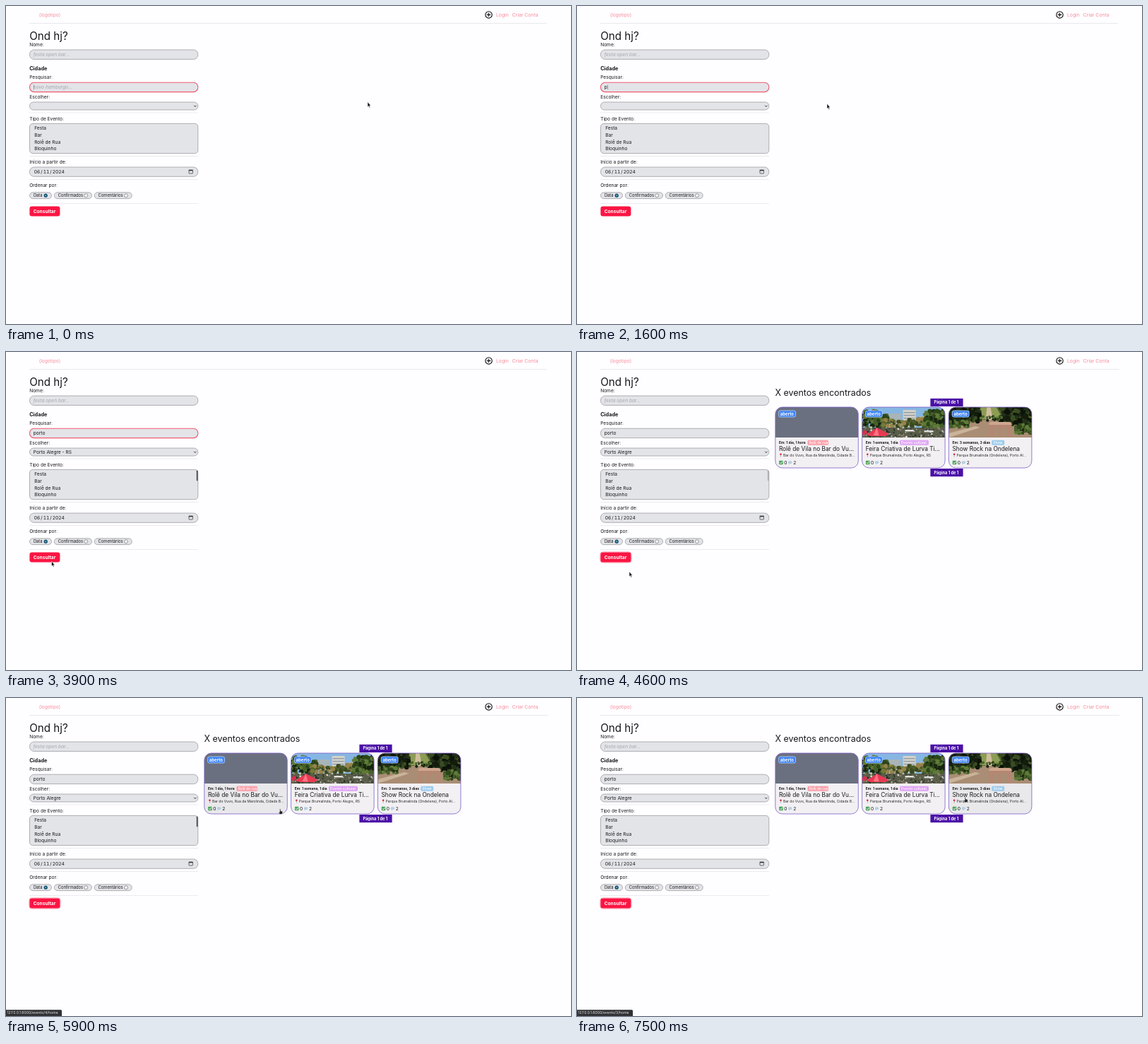
These frames come from a looping animation (800 px wide and 450 px high, 8000 ms). An HTML page:

```html
<!DOCTYPE html>
<html lang="pt-BR">
<head>
<meta charset="utf-8">
<title>Busca de eventos</title>
<style>
html, body { margin: 0; width: 100%; height: 100%; overflow: hidden; background: #fefdff; }
svg { display: block; width: 100vw; height: 100vh; font-family: Inter, sans-serif; }
text { white-space: pre; }
.date { font-variant-numeric: tabular-nums; }
</style>
</head>
<body>
<svg id="stage" viewBox="0 0 800 450"></svg>
<script>
const INK = '#18181b', FIELD = '#e3e4e8', EDGE = '#9c9ca3', PINK = '#f78d9b';

// Text placed by its left edge and the middle of its capitals.
const text = (x, cy, str, size = 6.6, fill = INK, attrs = '') =>
  `<text x="${x}" y="${cy + size * 0.364}" font-size="${size}" fill="${fill}" ${attrs}>${str}</text>`;
const bold = (x, cy, str, size, fill = INK) => text(x, cy, str, size, fill, 'font-weight="700"');
const rect = (x, y, w, h, fill, r = 0, attrs = '') =>
  `<rect x="${x}" y="${y}" width="${w}" height="${h}" rx="${r}" fill="${fill}" ${attrs}/>`;
const circle = (x, y, r, fill, attrs = '') =>
  `<circle cx="${x}" cy="${y}" r="${r}" fill="${fill}" ${attrs}/>`;
const path = (d, fill, attrs = '') => `<path d="${d}" fill="${fill}" ${attrs}/>`;
const field = (y, h, r = 6.3, id = '') =>
  rect(33.5, y, 238.3, h, FIELD, r, `stroke="${EDGE}" stroke-width=".8" ${id && `id="${id}"`}`);
const rule = y => rect(33, y, 239, 0.7, '#e4e4e8');

let seed = 7;
const random = () => (seed = (seed * 16807) % 2147483647) / 2147483647;
const blobs = (count, x, y, w, h, size, colors) => Array.from({ length: count }, () =>
  circle(x + random() * w, y + random() * h, size * (0.5 + random()),
    colors[Math.floor(random() * colors.length)])).join('');

function header() {
  return rect(33, 24, 733, 0.8, '#e4e4e8', 0, 'id="headerLine"') +
    text(46.7, 12.4, '(logotipo)', 6.7, PINK) +
    circle(683.5, 12.4, 4.7, 'none', 'stroke="#111" stroke-width="1.1"') +
    path('M680.8 12.4h5.4M683.5 9.7v5.4', 'none', 'stroke="#111" stroke-width="1.1"') +
    text(694, 12.4, 'Login', 6.8, PINK) + text(716.8, 12.4, 'Criar Conta', 6.8, PINK);
}

function radioPill(x, w, label, checked) {
  const cx = x + w - 8.3;
  return rect(x, 263.8, w, 8.8, FIELD, 4.4, `stroke="${EDGE}" stroke-width=".8"`) +
    text(x + 5.4, 268.2, label, 5.8) +
    (checked
      ? circle(cx, 268.2, 2.6, '#12506e') + circle(cx, 268.2, 1, '#7cc4ea')
      : circle(cx, 268.2, 2.5, '#f4f4f6', 'stroke="#666" stroke-width=".6"'));
}

function form() {
  const hint = (cy, str, id = '') => text(38.8, cy, str, 6.6, '#a3a6ae', `font-style="italic" id="${id}"`);
  const dateParts = ['06', '/', '11', '/', '2024'].map(s => `<tspan dx="1">${s}</tspan>`).join('');
  return text(33.2, 42, 'Ond hj?', 15.2) +
    text(33.2, 54.7, 'Nome:') + field(62, 13.4) + hint(68.7, 'festa open bar...', 'nameHint') +
    bold(33.2, 88.6, 'Cidade', 7.3) +
    text(33.2, 100.8, 'Pesquisar:') + field(108.2, 13.4, 6.3, 'search') +
    hint(114.8, 'novo hamburgo...', 'searchHint') + text(38.8, 114.8, '', 6.6, INK, 'id="typed"') +
    rect(39, 111.3, 0.5, 7, '#555', 0, 'id="caret"') +
    text(33.2, 128.3, 'Escolher:') + field(136, 11, 5.3) + text(38.8, 141.4, '', 6.6, INK, 'id="city"') +
    path('M266.2 140.8l1.6 1.7 1.6-1.7', 'none', 'stroke="#222" stroke-width=".9"') +
    rule(150.6) + text(33.2, 159.3, 'Tipo de Evento:') + field(166.4, 42.2, 4.5) +
    ['Festa', 'Bar', 'Rolê de Rua', 'Bloquinho'].map((s, i) => text(40.2, 173 + i * 9.6, s)).join('') +
    rect(269.8, 167.4, 1.7, 15, '#444', 0.8, 'id="scrollbar"') +
    rule(212) + text(33.2, 220.4, 'Início a partir de:') + field(228, 13.3) +
    text(38.8, 234.6, dateParts, 6.6, INK, 'class="date"') +
    rect(259, 232.2, 5.4, 4.8, 'none', 0.5, 'stroke="#333" stroke-width=".7"') +
    rect(258.8, 231.8, 5.8, 1.5, '#333') +
    rule(245.2) + text(33.2, 253.6, 'Ordenar por:') +
    radioPill(33.5, 31, 'Data', true) + radioPill(68.3, 53.2, 'Confirmados') +
    radioPill(125.2, 53, 'Comentários') + rule(279) +
    rect(32.8, 282.9, 44.2, 15.2, 'none', 3.8, 'id="buttonRing" stroke="#fba3b3" stroke-width="1"') +
    rect(33.4, 283.4, 43, 14.2, '#fb1543', 3.3) + bold(38.7, 290.5, 'Consultar', 6.6, '#fff');
}

// Each photo is drawn in a 117.5 x 43 box.
const leaves = ['#16240f', '#2c4519', '#46602a', '#5f7a38'];
const autumn = ['#4b5a2a', '#77793a', '#96834a', '#39491f'];
const shade = ['#0c1209', '#141d0d', '#22301a', '#3a4c22'];
const photos = [
  () => rect(0, 0, 118, 43, '#6b7080'),
  () => rect(0, 0, 118, 43, '#86b6e2') +
    rect(38, 9, 17, 20, '#a9b4b8') + rect(58, 4, 18, 24, '#d3d2ca') + rect(82, 13, 10, 14, '#bdb5a2') +
    [7, 11, 15, 19].map(y => rect(59, y, 16, 1.3, '#8b9aa5')).join('') +
    blobs(110, 0, 12, 36, 16, 2.6, leaves) + blobs(50, 4, 5, 18, 10, 2.4, leaves) +
    blobs(70, 28, 17, 62, 10, 2.4, autumn) + blobs(110, 88, 5, 30, 24, 2.6, leaves) +
    rect(0, 29, 118, 14, '#5b5d4c') +
    blobs(170, 0, 28, 118, 15, 1.1, ['#d8d6d0', '#23281f', '#8c8068', '#4f6238', '#3a4036']) +
    path('M6 39L21 29l17 9-5 3H12z', '#e83a52') + path('M21 29l3 11h-8z', '#fb7384') +
    path('M0 35l5-3 3 4-4 3H0z', '#d5324a') + rect(61, 32, 11, 2.4, '#e8e6df') + rect(88, 33, 13, 2.4, '#d9ddd9'),
  () => rect(0, 0, 118, 43, '#55662f') +
    path('M46 0h21l10 17H38z', '#8d9c55') + path('M54 0h5l4 19h-11z', '#cfbf9c') +
    path('M0 31L40 18h48l30 10v15H0z', '#a98d74') +
    path('M0 37l38-10 6 2-44 14z', '#c9b49b') +
    blobs(130, 0, 0, 44, 20, 3, shade) + blobs(150, 73, 0, 45, 25, 3, shade) +
    blobs(40, 0, 19, 28, 9, 2.4, leaves) + blobs(50, 94, 24, 24, 13, 2.4, leaves) +
    blobs(22, 42, 13, 34, 6, 1.6, leaves) +
    path('M57 43V25q0-4 4-4h24q4 0 4 4v18h-6V33q0-5-4-5t-4 5v10h-4V33q0-5-4-5t-4 5v10z', '#b48772') +
    path('M57 25q0-4 4-4h24q4 0 4 4z', '#cfa68f')
];

const events = [
  { x: 280.8, when: 'Em: 1 dia, 1 hora', tag: 'Rolê de rua', tagX: 45.6, tagW: 29.6, color: '#fb9fa9',
    title: 'Rolê de Vila no Bar do Vu...', place: 'Bar do Vuvo, Rua da Marolinda, Cidade B...', id: 4 },
  { x: 403.6, when: 'Em: 1 semana, 1 dia', tag: 'Evento cultural', tagX: 53.4, tagW: 41, color: '#e0a4f5',
    title: 'Feira Criativa de Lurva Ti...', place: 'Parque Brumalinda, Porto Alegre, RS', id: 6 },
  { x: 526.4, when: 'Em: 3 semanas, 3 dias', tag: 'Show', tagX: 60.8, tagW: 18, color: '#9ccbed',
    title: 'Show Rock na Ondelena', place: 'Parque Brumalinda (Ondelena), Porto Al...', id: 3 }
];

function card(event, i) {
  return `<g transform="translate(${event.x} 78)"><g clip-path="url(#cardShape)">` +
    rect(0, 0, 117.5, 86, '#f2f0f3', 0, `id="card${i}"`) +
    `<g clip-path="url(#photoShape)">${photos[i]()}</g></g>` +
    rect(0, 0, 117.5, 86, 'none', 10, 'stroke="#7a5fc6" stroke-width=".8"') +
    rect(4.9, 5, 23.8, 9, '#3b82f6', 2.2, 'stroke="#b8d4ff" stroke-width=".8"') +
    bold(7, 9.6, 'aberto', 6, '#fff') +
    bold(5.1, 50.2, event.when, 4.95) +
    rect(event.tagX, 46.8, event.tagW, 6.9, event.color, 1.8) +
    text(event.tagX + 2, 50.2, event.tag, 5, '#fff', 'font-weight="500"') +
    text(5.1, 59.3, event.title, 8.3) +
    circle(7.7, 66.7, 1.3, '#e11d35') + path('M7.4 67.5h.6v3.2h-.6z', '#888') +
    text(11.2, 67.9, event.place, 5, '#27272a') +
    rect(5.3, 75.7, 5.6, 5.6, '#4aa35a', 1) +
    path('M6.5 78.5l1.4 1.6 2.2-3.2', 'none', 'stroke="#fff" stroke-width=".9"') +
    text(12.4, 78.6, '0') + rect(18.2, 76.2, 5.4, 3.8, '#b7d0e3', 1.5) + path('M19.3 79v2.4l2.2-1.8z', '#b7d0e3') +
    text(25.4, 78.6, '2') + '</g>';
}

function results() {
  const pager = y => rect(500.4, y, 46.2, 11.2, '#4a10a6') + bold(505.4, y + 5.6, 'Página 1 de 1', 5.7, '#fff');
  return '<g id="results">' + text(280.4, 57.7, 'X eventos encontrados', 12.47) +
    pager(65.8) + events.map(card).join('') + pager(165) + '</g>';
}

const overlay = '<g id="status">' + rect(-2, 441.2, 81, 11, '#303134', 1.5) +
  text(1.5, 445.6, '', 5.1, '#e8e8e8', 'id="statusText"') + '</g>' +
  '<g id="cursor" stroke="#fff" stroke-width=".5" stroke-linejoin="round">' +
  path('M0-.2V6.8L1.5 5.5 2.5 8 3.6 7.5 2.6 5.1H4.5z', '#111', 'id="arrow"') +
  path('M-.7.5Q0-.5.7.5V3l2.2.5Q3.6 3.8 3.4 5L2.8 7.8H-.6L-2.2 5.2Q-2.3 4-.7 5z', '#222', 'id="hand"') + '</g>';

document.getElementById('stage').innerHTML =
  `<defs><clipPath id="cardShape"><rect width="117.5" height="86" rx="10"/></clipPath>
   <clipPath id="photoShape"><rect width="117.5" height="43"/></clipPath></defs>` +
  header() + form() + results() + overlay;

const $ = id => document.getElementById(id);
const show = (id, on) => $(id).setAttribute('visibility', on ? 'visible' : 'hidden');
const put = (id, str) => { if ($(id).textContent !== str) $(id).textContent = str; };

// Rows of [time, ...values], linear in between.
function along(keys, t) {
  const next = keys.findIndex(k => k[0] > t);
  if (next < 0) return keys[keys.length - 1].slice(1);
  if (next === 0) return keys[0].slice(1);
  const a = keys[next - 1], b = keys[next], p = (t - a[0]) / (b[0] - a[0]);
  return a.slice(1).map((v, i) => v + (b[i + 1] - v) * p);
}

const cursorPath = [
  [100, 512, 136], [600, 352, 134], [700, 350, 133], [1100, 354, 138.5], [1700, 354, 138.5],
  [2700, 333, 150], [3100, 262, 175], [3500, 62, 262], [3900, 64.5, 296.3], [4200, 66, 298],
  [4400, 66, 298], [4600, 74, 311], [4900, 180, 357], [5100, 290, 270], [5300, 343, 166],
  [5500, 347, 156.5], [5700, 347, 156.5], [6200, 450, 157], [6400, 433.5, 147], [6900, 433.5, 147],
  [7500, 549.8, 140]
];
const scrollbarFade = [
  [2700, 0], [2900, 1], [3900, 1], [4200, 0], [4400, 0], [4600, 0.3], [4800, 1], [5900, 1], [6200, 0]
];
const keystrokes = [1600, 1700, 1900, 2000, 2100];

function draw(now) {
  const t = Math.floor((now % 8000) / 100) * 100;
  const typed = 'porto'.slice(0, keystrokes.filter(k => k <= t).length);
  const submitted = t >= 4100, found = t >= 4500;

  put('typed', typed);
  show('searchHint', !typed);
  show('caret', t < 2700);
  $('caret').setAttribute('x', 39 + (typed ? $('typed').getComputedTextLength() : 0));
  $('search').setAttribute('stroke', submitted ? EDGE : '#ee5a70');
  $('search').setAttribute('stroke-width', submitted ? 0.8 : 1.1);
  put('city', t < 2700 ? '' : t < 4200 ? 'Porto Alegre - RS' : 'Porto Alegre');
  $('scrollbar').setAttribute('opacity', along(scrollbarFade, t)[0]);
  show('buttonRing', submitted);
  $('headerLine').setAttribute('width', submitted ? 735 : 733);
  show('results', found);

  const [x, y] = along(cursorPath, t);
  const hovered = found ? events.findIndex(e => x > e.x && x < e.x + 117.5 && y > 78 && y < 164) : -1;
  events.forEach((e, i) => $('card' + i).setAttribute('fill', i === hovered ? '#e9e8eb' : '#f2f0f3'));
  $('cursor').setAttribute('transform', `translate(${x} ${y})`);
  const pointer = t < 1700 || t >= 2700;
  show('arrow', pointer && hovered < 0);
  show('hand', pointer && hovered >= 0);

  const linked = events[t < 6300 ? 0 : t < 7300 ? 1 : 2];
  show('status', t >= 5700);
  put('statusText', `127.0.0.1:8000/evento/${linked.id}/home`);
}

function loop() {
  draw(performance.now());
  requestAnimationFrame(loop);
}
loop();
</script>
</body>
</html>
```
